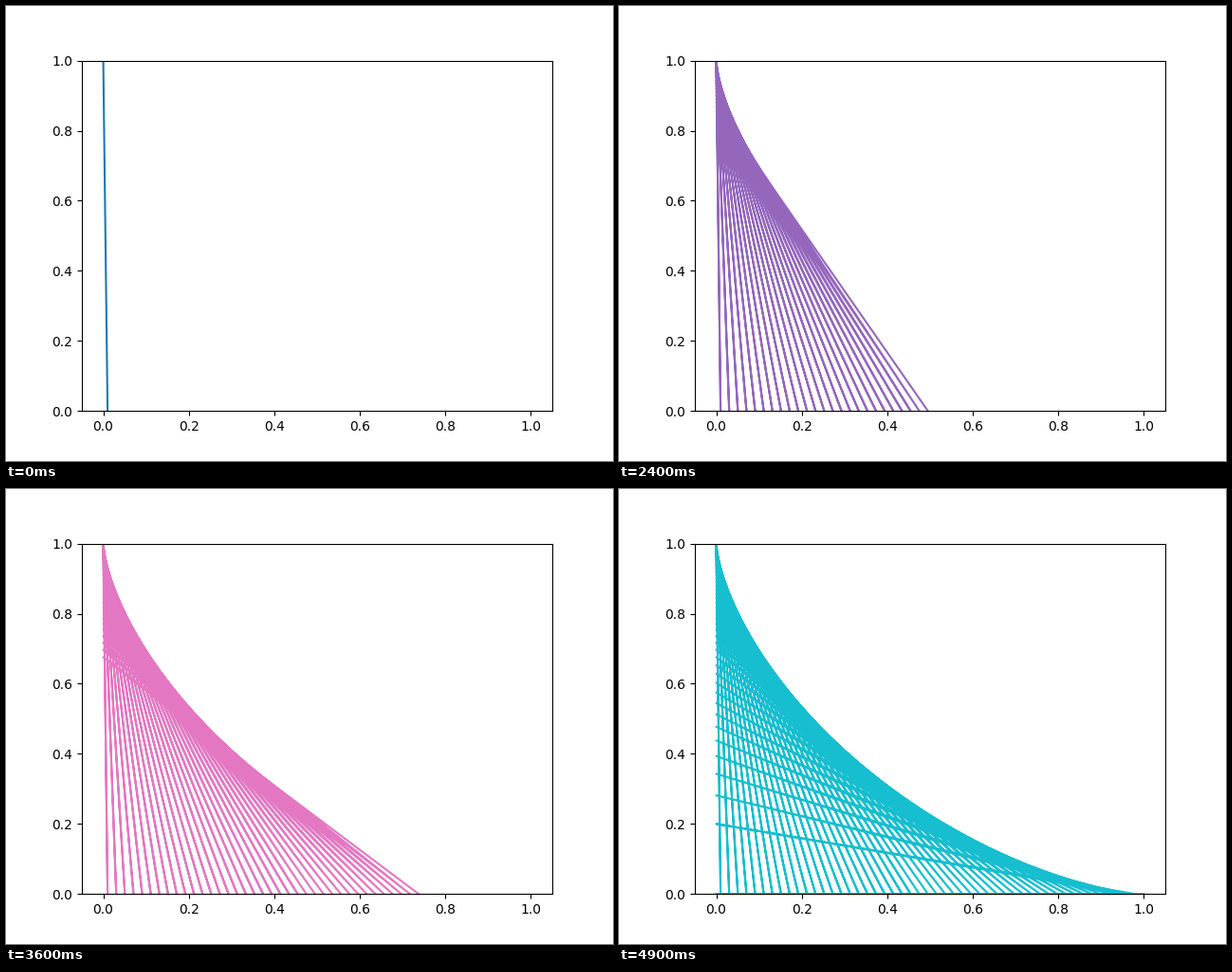
Animation, 640 px wide and 480 px high, one loop 5000 ms. Source, as a matplotlib script:

```python
import matplotlib.pyplot as plt
import numpy as np
from matplotlib.animation import FuncAnimation

FRAMES = 50
INTERVAL = 100

# Foot positions of a unit ladder sliding down a wall.
feet = np.linspace(0, 1, 2 * FRAMES)[1::2]
tops = np.sqrt(1 - feet**2)

# One continuous zigzag: wall, floor, wall, floor, ...
zigzag_x = np.column_stack([np.zeros(FRAMES), feet]).ravel()
zigzag_y = np.column_stack([tops, np.zeros(FRAMES)]).ravel()

fig, ax = plt.subplots(figsize=(6.4, 4.8), dpi=100)
ax.set_xlim(-0.05, 1.05)
ax.set_ylim(0, 1)
(line,) = ax.plot([], [])


def update(frame):
    count = 2 * (frame + 1)
    line.set_data(zigzag_x[:count], zigzag_y[:count])
    line.set_color(f"C{frame % 10}")
    return (line,)


animation = FuncAnimation(
    fig, update, frames=FRAMES, interval=INTERVAL, repeat=True, repeat_delay=0
)
plt.show()
```
